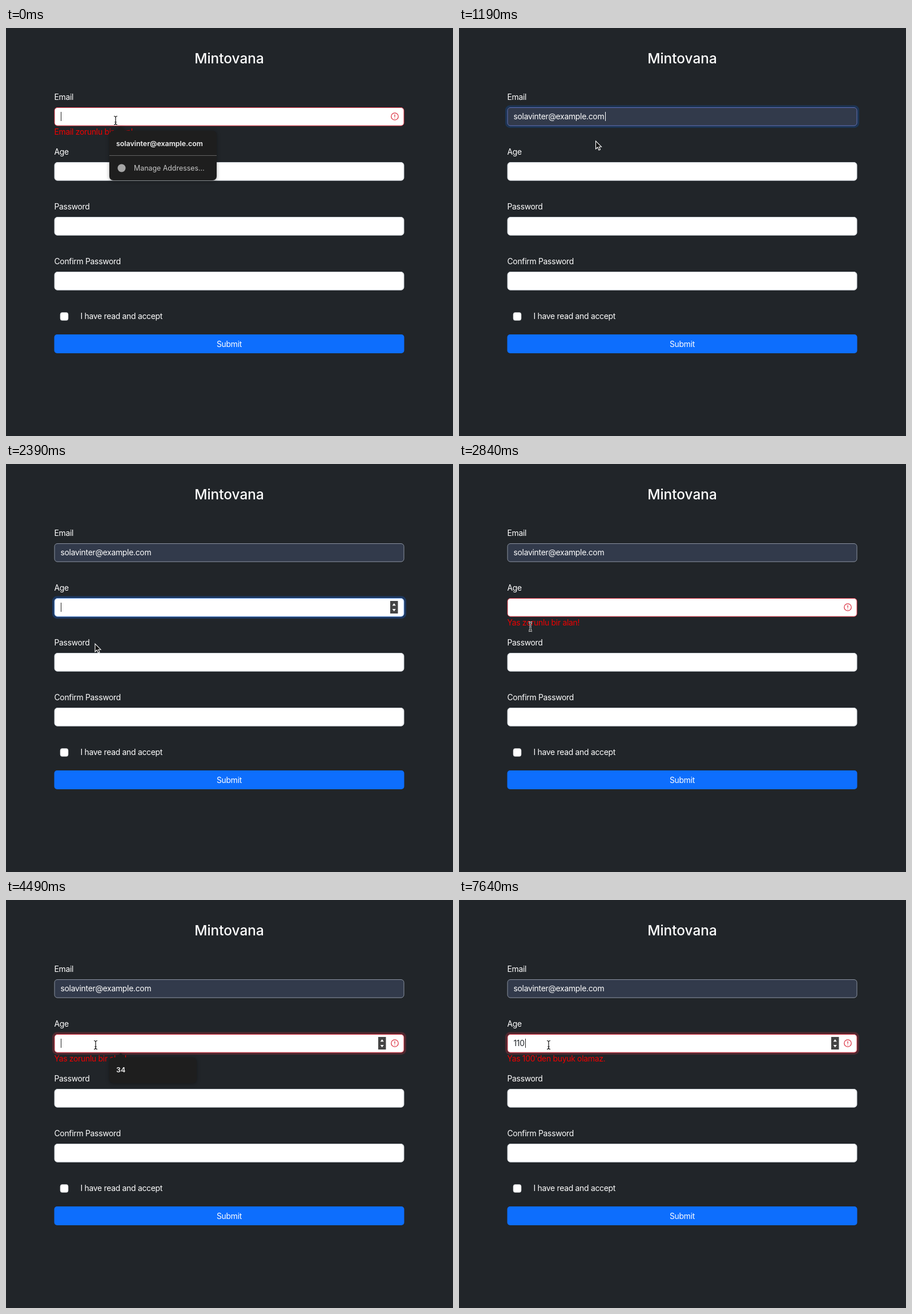
Recreate the animation shown at these times as an HTML page. Size 783x715 px, loop 8000 ms.

```html
<!DOCTYPE html>
<html lang="en">
<head>
<meta charset="utf-8">
<title>Sign-up form</title>
<style>
  html, body { margin: 0; width: 100%; height: 100%; overflow: hidden; background: #212529; }
  svg { display: block; width: 783px; height: 715px; }
  text { font: 13.9px Inter, "Liberation Sans", sans-serif; letter-spacing: -.02em; fill: #fff; }
  .title { font-size: 24.4px; font-weight: 500; letter-spacing: 0; }
  .mid { text-anchor: middle; }
  .field { fill: #fff; stroke: #ced4da; }
  .field.bad { stroke: #dc3545; }
  .field.focus { stroke: #86b7fe; }
  .field.filled { fill: #323a4b; stroke: #8b93a1; }
  .field.filled.focus { stroke: #6372bd; }
  .glow { fill: none; stroke-width: 3.5; }
  .error { fill: #f00000; }
  .icon { fill: none; stroke: #dc3545; stroke-width: 1.3; stroke-linecap: round; }
  .popup { filter: drop-shadow(0 1px 3px rgba(0, 0, 0, .35)); }
  .popup .box { fill: #1e1e1e; }
  .popup text { font-size: 12.4px; letter-spacing: 0; fill: #e8e8e8; }
  .popup .bold { font-weight: 600; fill: #f2f2f2; }
  .popup .soft { fill: #c6c6c6; }
  .halo { fill: none; stroke: #fff; stroke-width: 2.8; stroke-linejoin: round; }
  .ink { fill: none; stroke: #111; stroke-width: 1.2; }
</style>
</head>
<body>
<svg viewBox="0 0 783 715">
  <defs>
    <path id="beamShape" d="M-3-7.5Q0-7.5 0-5V5Q0 7.5-3 7.5M3-7.5Q0-7.5 0-5M0 5Q0 7.5 3 7.5M-1.7 3H1.7"/>
    <g id="alert" class="icon">
      <circle r="6.2"/>
      <path d="M0-3V.4M0 2.9V3"/>
    </g>
  </defs>

  <text class="title mid" x="391" y="62">Mintovana</text>
  <g id="form"></g>

  <rect x="95" y="498.5" width="14" height="14" rx="3.5" fill="#fff" stroke="#bfc3c7" stroke-width=".6"/>
  <text x="130.5" y="510">I have read and accept</text>
  <rect x="84.5" y="537" width="613" height="33" rx="5" fill="#0d6efd"/>
  <text class="mid" x="391" y="558.5">Submit</text>

  <text id="mailText" x="95.5" y="160">solavinter@example.com</text>
  <text id="ageText" x="95.5" y="256" style="fill:#212529"></text>
  <text id="mailError" class="error" x="84.5" y="187">Email zorunlu bir alan!</text>
  <text id="ageError" class="error" x="84.5" y="283"></text>
  <use id="mailAlert" href="#alert" x="681" y="155"/>
  <use id="ageAlert" href="#alert" x="681" y="251"/>

  <g id="spinner">
    <rect y="240" width="13.5" height="22" fill="#444"/>
    <path d="M3.7 248.2H9.8L6.75 244ZM3.7 254H9.8L6.75 258.2Z" fill="#fff"/>
  </g>
  <rect id="caret" width="1" height="16"/>

  <g id="mailPopup" class="popup">
    <path class="box" d="M192 181L201 172L210 181Z"/>
    <rect class="box" x="181" y="180" width="188" height="87" rx="7"/>
    <rect id="hover" x="181" y="182" width="188" height="40" fill="#39393b"/>
    <text class="bold" x="193" y="206.5">solavinter@example.com</text>
    <path d="M181 223.5H369" stroke="#626262"/>
    <circle cx="202.5" cy="245.5" r="7" fill="#a6a6a6"/>
    <text class="soft" x="224" y="250">Manage Addresses…</text>
  </g>
  <g id="agePopup" class="popup">
    <path class="box" d="M192 277L201 268L210 277Z"/>
    <rect class="box" x="181" y="276" width="153" height="45" rx="7"/>
    <text class="bold" x="193" y="302">34</text>
  </g>

  <g id="beam">
    <use href="#beamShape" class="halo"/>
    <use href="#beamShape" class="ink"/>
  </g>
  <path id="arrow" d="M0 0V14L3.3 11L5.5 16L8 15L5.8 10.2H10Z" fill="#111" stroke="#fff" stroke-width="1.1"/>
</svg>

<script>
const LOOP = 8000;
const $ = id => document.getElementById(id);
const BLUE = '#0d6efd', RED = '#dc3545';

$('form').innerHTML = ['Email', 'Age', 'Password', 'Confirm Password'].map((label, i) => {
  const y = 139 + i * 96;
  return `<text x="84.5" y="${y - 13}">${label}</text>
    <rect id="glow${i}" class="glow" x="82.75" y="${y - 1.75}" width="616.5" height="36" rx="6.5"/>
    <rect id="field${i}" class="field" x="85" y="${y + .5}" width="612" height="31.7" rx="5"/>`;
}).join('');

const TOO_YOUNG = "Yas 18'den kucuk olamaz.";
const TOO_OLD = "Yas 100'den buyuk olamaz.";
const REQUIRED = 'Yas zorunlu bir alan!';

// Each step changes only the listed parts; everything else is kept.
const steps = [
  [0, { mail: 'bad', age: '', mailGlow: [RED, 0], ageGlow: [BLUE, 0], mailText: 0, mailError: 1,
        mailPopup: 1, hover: 0, agePopup: 0, ageText: '', ageError: '', ageAlert: 0,
        spin: 0, caret: [96, 147] }],
  [140, { mailGlow: [RED, .25] }],
  [590, { hover: 1, mail: 'filled focus', mailText: 1, caret: 0 }],
  [890, { mailPopup: 0, mailError: 0, mailGlow: [BLUE, .2], caret: [256, 147] }],
  [1790, { mail: 'filled', mailGlow: [BLUE, .1], age: 'focus', ageGlow: [BLUE, .12],
           spin: 673, caret: [96, 243] }],
  [1940, { mailGlow: [BLUE, 0], ageGlow: [BLUE, .25], agePopup: 1 }],
  [2390, { agePopup: 0 }],
  [2540, { age: 'bad', ageGlow: [RED, .12], ageError: REQUIRED, ageAlert: 1, spin: 0, caret: 0 }],
  [2690, { ageGlow: [RED, 0] }],
  [3440, { spin: 652 }],
  [3590, { ageGlow: [RED, .15], caret: [96, 243] }],
  [3740, { ageGlow: [RED, .25], agePopup: 1 }],
  [4040, { caret: 0 }],
  [4490, { caret: [96, 243] }],
  [5090, { agePopup: 0, ageText: '1', ageError: TOO_YOUNG, caret: [101.5, 243] }],
  [5540, { caret: 0 }],
  [5990, { caret: [101.5, 243] }],
  [6440, { ageText: '11', caret: [107.5, 243] }],
  [6590, { ageText: '110', ageError: TOO_OLD, caret: [116, 243] }],
  [7190, { caret: 0 }],
  [7640, { caret: [116, 243] }]
];

const pointer = [
  [0, 'beam', 192, 162], [440, 'beam', 199, 168], [590, 'arrow', 218, 187],
  [740, 'arrow', 234, 197], [890, 'arrow', 239.5, 198], [1340, 'arrow', 238, 202],
  [1490, 'arrow', 229, 216], [1640, 'beam', 213, 247], [1790, 'beam', 206, 259],
  [1940, 'beam', 205, 260], [2240, 'arrow', 190, 284], [2390, 'arrow', 156, 315],
  [2540, 'beam', 139, 310], [2690, 'beam', 128, 293], [2840, 'beam', 125, 285],
  [3140, 'beam', 130, 279], [3290, 'beam', 143, 265], [3440, 'beam', 154, 256],
  [3590, 'beam', 157, 254]
];

const show = (id, on) => { $(id).style.display = on ? '' : 'none'; };
const place = (id, x, y) => $(id).setAttribute('transform', `translate(${x} ${y})`);

function field(i, look, [color, alpha]) {
  $('field' + i).setAttribute('class', 'field ' + look);
  $('glow' + i).style.stroke = color;
  $('glow' + i).style.strokeOpacity = alpha;
}

function draw(t) {
  const past = list => list.filter(step => step[0] <= t);
  const s = Object.assign({}, ...past(steps).map(step => step[1]));

  field(0, s.mail, s.mailGlow);
  field(1, s.age, s.ageGlow);
  for (const id of ['mailText', 'mailError', 'mailPopup', 'hover', 'agePopup', 'ageAlert']) show(id, s[id]);
  show('mailAlert', s.mail === 'bad');
  $('ageText').textContent = s.ageText;
  $('ageError').textContent = s.ageError;

  show('spinner', s.spin);
  place('spinner', s.spin, 0);
  show('caret', s.caret);
  if (s.caret) {
    place('caret', ...s.caret);
    $('caret').style.fill = s.caret[1] < 200 && s.mailText ? '#fff' : '#222';
  }

  const [, kind, x, y] = past(pointer).pop();
  show('beam', kind === 'beam');
  show('arrow', kind === 'arrow');
  place(kind, x, y);
}

const start = performance.now();
function tick() {
  draw((performance.now() - start) % LOOP);
  requestAnimationFrame(tick);
}
tick();
</script>
</body>
</html>
```
